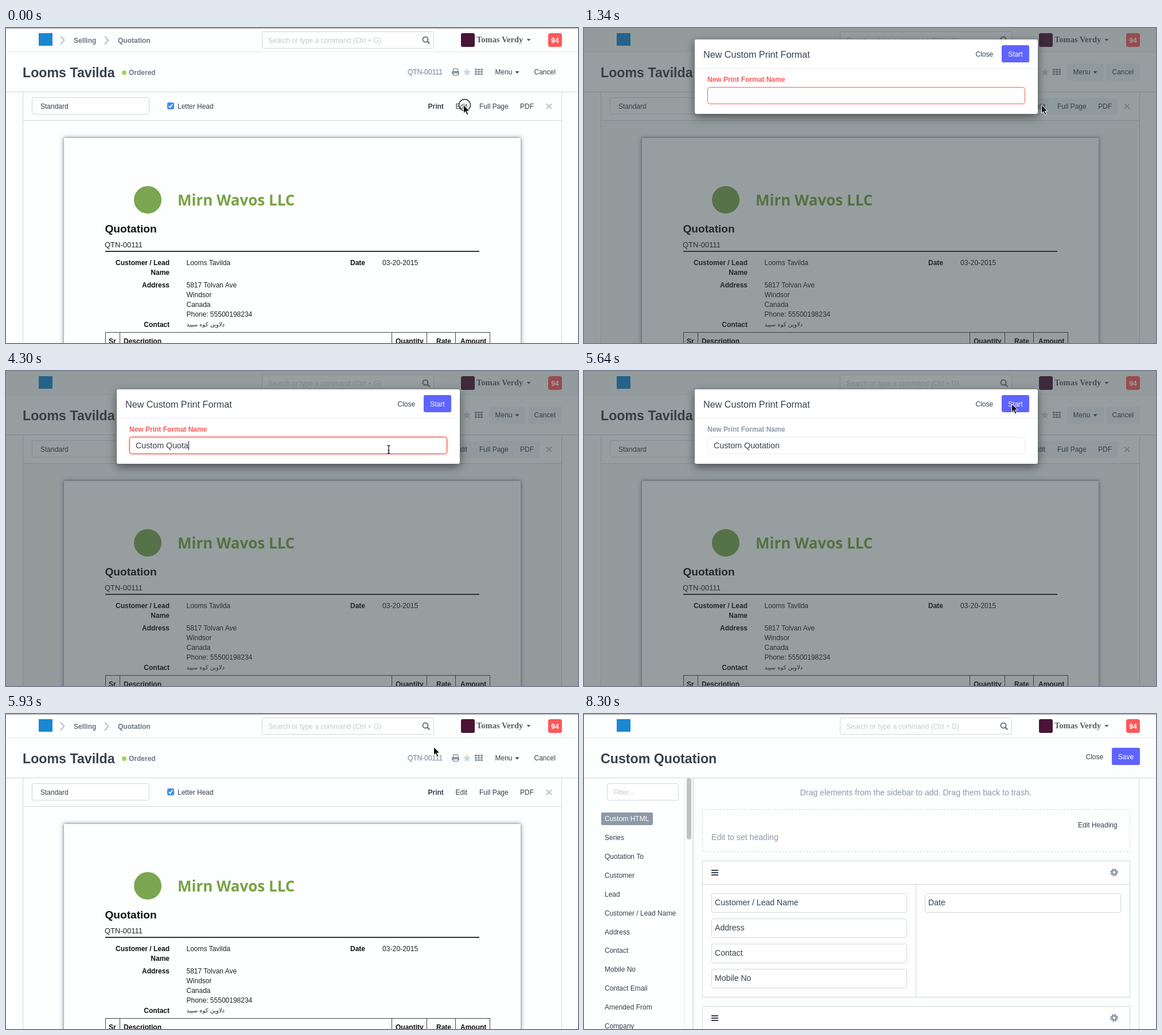
An HTML page for the animation above (8790 ms loop, 997 by 550 pixels).

```html
<!DOCTYPE html>
<html lang="en">
<head>
<meta charset="utf-8">
<title>Custom print format</title>
<style>
html, body { margin: 0; width: 100%; height: 100%; overflow: hidden; background: #fdfefe; }
svg { display: block; }
text { font-family: "Liberation Sans", Arial, sans-serif; white-space: pre; }
</style>
</head>
<body>
<svg id="stage" width="997" height="550" viewBox="0 0 997 550"></svg>
<script>
const INK = '#36414c', MUTED = '#8d99a6', LINE = '#d1d8dd', RED = '#ff5858', BLUE = '#5e64ff', PAGE = '#fdfefe';

// Drawing helpers returning SVG markup
const text = (x, y, str, { size = 12, fill = INK, bold = false, anchor = 'start', extra = '' } = {}) =>
  `<text x="${x}" y="${y}" font-size="${size}" fill="${fill}" text-anchor="${anchor}" ${bold ? 'font-weight="700"' : ''} ${extra}>${str}</text>`;
const rect = (x, y, w, h, fill, extra = '') =>
  `<rect x="${x}" y="${y}" width="${w}" height="${h}" fill="${fill}" ${extra}/>`;
const box = (x, y, w, h, stroke = LINE, rx = 3, extra = '') =>
  rect(x + .5, y + .5, w - 1, h - 1, '#fefefe', `stroke="${stroke}" rx="${rx}" ${extra}`);
const hLine = (x1, x2, y, color = LINE, h = 1) => rect(x1, y, x2 - x1, h, color);
const vLine = (x, y1, y2, color = LINE, w = 1) => rect(x, y1, w, y2 - y1, color);
const stroke = (d, color, width = 1) => `<path d="${d}" fill="none" stroke="${color}" stroke-width="${width}"/>`;
const caretDown = (x, y, fill = INK) => `<path d="M${x} ${y}h7l-3.5 4z" fill="${fill}"/>`;
const group = (id, content) => `<g id="${id}">${content}</g>`;

const navbar = () =>
  rect(57, 9, 24, 22, '#1a88d0') +
  box(446, 6, 300, 30) +
  text(457, 26, 'Search or type a command (Ctrl + G)', { fill: '#c3cad0' }) +
  `<circle cx="731" cy="20" r="4.5" fill="none" stroke="#6c757d" stroke-width="2"/>` +
  stroke('M734.5 23.5l4 4', '#6c757d', 2.4) +
  rect(793, 9, 24, 24, '#4a1338', 'rx="3"') +
  text(820, 25, 'Tomas Verdy', { size: 14.5, bold: true, fill: '#5a5f63', extra: `style="font-family:'Liberation Serif',Times,serif"` }) +
  caretDown(907.5, 19, '#5a5f63') +
  rect(945, 9, 24, 24, RED, 'rx="4"') +
  text(957, 26, '94', { bold: true, fill: '#fff', anchor: 'middle' }) +
  hLine(0, 997, 41, '#e3e7ea');

const breadcrumbs = () =>
  [95, 172].map(x => stroke(`M${x} 14.5l6.5 7-6.5 7`, '#b8c0c8', 2)).join('') +
  text(118, 26, 'Selling', { bold: true, fill: '#6c7680' }) +
  text(195, 26, 'Quotation', { bold: true, fill: '#6c7680' });

const toolIcons = () =>
  rect(777, 75, 13, 6, MUTED, 'rx="1.5"') +
  `<path d="M779.8 75v-4h7l1 1v3M779.8 78.5h8v4h-8z" fill="#fff" stroke="${MUTED}" stroke-width="1.4"/>` +
  `<path d="M803.5 70l2 4.4 4.8.6-3.5 3.3.9 4.8-4.2-2.4-4.2 2.4.9-4.8-3.5-3.3 4.8-.6z" fill="${LINE}"/>` +
  [0, 1, 2].flatMap(r => [0, 1, 2].map(c => rect(817 + c * 5, 71 + r * 4, 4, 3, MUTED))).join('');

const paper = () => {
  const strong = { bold: true, fill: '#111', anchor: 'end' };
  const plain = { fill: '#222' };
  const columns = [[179, 'Sr'], [205, 'Description'], [679, 'Quantity'], [750, 'Rate'], [792, 'Amount']];
  return rect(101, 192, 796, 400, PAGE, 'style="filter:drop-shadow(0 0 2px #75828c) drop-shadow(0 0 4px #b4bfc7)"') +
    `<circle cx="247" cy="300" r="24" fill="#7aa650"/>` +
    text(299, 310, 'Mirn Wavos LLC', { size: 26, bold: true, fill: '#76a343', extra: `style="font-family:'Open Sans','Noto Sans',sans-serif"` }) +
    text(172.5, 357, 'Quotation', { size: 19.1, bold: true, fill: '#111' }) +
    text(172, 383, 'QTN-00111', { size: 13, ...plain }) +
    hLine(173, 825, 389, '#333', 2) +
    text(285, 414, 'Customer / Lead', strong) + text(285, 431, 'Name', strong) +
    text(285, 453, 'Address', strong) + text(285, 522, 'Contact', strong) + text(626, 414, 'Date', strong) +
    text(314.5, 414, 'Looms Tavilda', plain) + text(656, 414, '03-20-2015', { size: 12.2, ...plain }) +
    ['5817 Tolvan Ave', 'Windsor', 'Canada', 'Phone: 55500198234'].map((s, i) => text(314.5, 453 + i * 17, s, plain)).join('') +
    text(314.5, 521, 'دلاوین کوه سپید', { size: 10, ...plain, extra: `style="font-family:'DejaVu Sans',sans-serif"` }) +
    hLine(173, 844, 531, '#444') +
    [173, 198, 672, 733, 783, 843].map(x => vLine(x, 531, 550, '#444')).join('') +
    columns.map(([x, s]) => text(x, 551, s, { bold: true, fill: '#111' })).join('');
};

const quotationPage = () =>
  breadcrumbs() +
  group('shades',
    rect(0, 1, 997, 40, '#f5f7fa') + rect(30, 162, 938, 388, '#f5f7fa') +
    [[842, 62, 64], [910, 62, 59], [814, 122, 72], [886, 122, 44], [773, 122, 41]].map(([x, y, w]) => rect(x, y, w, 30, '#f0f3f7', 'rx="3"')).join('')) +
  rect(773, 121, 42, 30, '#e8edf1', 'id="editPressed" rx="3"') +
  text(29, 86, 'Looms Tavilda', { size: 23.2, bold: true }) +
  `<circle cx="206" cy="78" r="4" fill="#98d85b"/>` +
  text(214, 82, 'Ordered', { bold: true, fill: '#6c7680' }) +
  text(700, 81, 'QTN-00111', { fill: MUTED, extra: `stroke="${MUTED}" stroke-width=".3"` }) +
  toolIcons() +
  text(852.5, 81, 'Menu') + caretDown(887.5, 75.5) + text(920.5, 81, 'Cancel') +
  vLine(29, 112, 550) + vLine(968, 112, 550) + hLine(30, 968, 161) +
  box(45, 121, 205, 30) + text(60, 141, 'Standard') +
  rect(281, 130, 12, 12, '#3b8df5', 'rx="2.5"') + stroke('M283.7 136l2.5 2.8 4.2-6', '#fff', 1.7) +
  text(299, 141, 'Letter Head') +
  text(735.5, 141, 'Print', { bold: true }) +
  [[783.5, 'Edit'], [825, 'Full Page'], [896, 'PDF']].map(([x, s]) => text(x, 141, s)).join('') +
  stroke('M942 132.5l9 8.5m0-8.5l-9 8.5', '#b9bfc4', 2) +
  paper();

const sectionIcons = y =>
  [-5, -1, 3].map(d => rect(222, y + d, 12, 2, INK)).join('') +
  `<g fill="none" stroke="${MUTED}"><circle cx="924" cy="${y - .5}" r="3.8" stroke-width="3"/>` +
  `<circle cx="924" cy="${y - .5}" r="5.9" stroke-width="2.4" stroke-dasharray="2.3 2.33"/></g>`;

const builderPage = () => {
  const fields = ['Series', 'Quotation To', 'Customer', 'Lead', 'Customer / Lead Name', 'Address', 'Contact',
    'Mobile No', 'Contact Email', 'Amended From', 'Company'];
  const field = (x, y, w, s) => box(x, y, w, 34) + text(x + 6, y + 21, s, { size: 14.1 });
  return text(29, 86, 'Custom Quotation', { size: 23.2, bold: true }) +
    text(874.5, 79, 'Close') +
    rect(920, 59, 49, 30, BLUE, 'rx="3"') + text(944.5, 79, 'Save', { fill: '#fff', anchor: 'middle' }) +
    box(40, 121, 125, 30) + text(51, 141, 'Filter...', { fill: '#c3cad0' }) +
    rect(30, 172, 90, 22, MUTED, 'rx="2"') + text(36, 187, 'Custom HTML', { fill: '#fff' }) +
    fields.map((s, i) => text(36, Math.round(220 + i * 32.9), s)).join('') +
    vLine(175, 112, 550, '#e4e8eb') + rect(179, 112, 8, 107, '#c1c1c1', 'rx="4"') +
    vLine(189.5, 112, 550, LINE, 1.5) + vLine(967, 112, 550) +
    text(376.5, 142, 'Drag elements from the sidebar to add. Drag them back to trash.', { size: 14.13, fill: MUTED }) +
    box(206, 166, 746, 75, LINE, 0, 'stroke-dasharray="3 3"') +
    text(861, 198, 'Edit Heading') + text(222, 220, 'Edit to set heading', { size: 14.1, fill: MUTED }) +
    box(206, 256, 746, 239, LINE, 0) + hLine(206, 952, 297) + vLine(578, 297, 495) + sectionIcons(277) +
    ['Customer / Lead Name', 'Address', 'Contact', 'Mobile No'].map((s, i) => field(222, 313 + i * 44, 341, s)).join('') +
    field(594, 313, 342, 'Date') +
    box(206, 510, 746, 60, LINE, 0) + sectionIcons(531);
};

const modal = () =>
  rect(193, 32, 598, 130, '#fff', 'rx="3" style="filter:drop-shadow(0 5px 8px rgba(0,0,0,.5))"') +
  text(208, 64, 'New Custom Print Format', { size: 16.15 }) +
  text(682.5, 62, 'Close') +
  rect(728, 42, 48, 30, BLUE, 'rx="3"') + text(752, 62, 'Start', { fill: '#fff', anchor: 'middle' }) +
  hLine(193, 791, 82, '#e8ebee') +
  text(215, 106, 'New Print Format Name', { bold: true, extra: 'id="label"' }) +
  box(215, 115, 554, 30, RED, 4, 'id="input"') +
  text(226, 135, '', { size: 14.25, extra: 'id="typed"' }) +
  rect(0, 122, 1, 16, '#222', 'id="caret"');

const pointers = () =>
  `<circle id="ring" cx="2.5" cy=".5" r="10" fill="none" stroke="#222" stroke-width="1.3"/>` +
  `<path id="arrow" d="M.5.5v14.5l3.4-3.2 2.6 6 2.5-1.1-2.6-5.7h4.7z" fill="#111" stroke="#fff"/>` +
  `<path id="beam" d="M-2.5-7q2.5 0 2.5 2V5q0 2-2.5 2M2.5-7q-2.5 0-2.5 2M0 5q0 2 2.5 2M-1.5 1.5h3" fill="none" stroke="#222" stroke-width="1.3"/>`;

document.getElementById('stage').innerHTML =
  rect(0, 0, 997, 550, PAGE) + group('quotation', quotationPage()) + group('builder', builderPage()) +
  group('nav', navbar()) + hLine(0, 997, 111) +
  rect(0, 1, 997, 549, '#334143', 'id="backdrop"') + group('modal', modal()) +
  hLine(0, 997, 0, '#999') + group('cursor', pointers());

const el = Object.fromEntries([...document.querySelectorAll('[id]')].map(e => [e.id, e]));
const show = (e, visible) => e.setAttribute('display', visible ? 'inline' : 'none');
const set = (e, attrs) => Object.entries(attrs).forEach(([k, v]) => e.setAttribute(k, v));

const LOOP = 8790, STEP = 148.2;

// Stepped tracks: each entry holds from its time until the next one
const cursorTrack = [
  [0, 797, 134], [1630, 768, 140], [1780, 716, 147], [1930, 680, 149], [2070, 669, 142], [2220, 667, 137],
  [5040, 684, 120], [5190, 716, 86], [5340, 741, 61], [5490, 745, 57],
  [6820, 738, 74], [6970, 718, 106], [7120, 708, 122], [7410, 711, 122], [7560, 714, 123], [8160, 739, 171]];
const typingTrack = [
  [0, 0], [2970, 1], [3120, 2], [3270, 4], [3410, 6], [3560, 7], [3710, 8], [3860, 10],
  [4150, 11], [4300, 12], [4450, 14], [4600, 16]];
const at = (track, t) => track.findLast(([start]) => start <= t).slice(1);
const within = (t, start, end) => t >= start && t < end;
const ramp = (t, start, duration) => Math.min(1, Math.max(0, (t - start) / duration));
const easeOut = p => 1 - (1 - p) ** 2;

// The dialog slides down while fading in, and back up while fading out
function dialogState(t) {
  const open = 1214, close = 5733, slide = 300, travel = 33;
  return {
    dim: .5 * (ramp(t, open - 200, 200) - ramp(t, close, 110)),
    opacity: ramp(t, open, 100) - ramp(t, close, 180),
    offset: -travel * (1 - easeOut(ramp(t, open, slide)) + easeOut(ramp(t, close, slide))),
  };
}

function render(t) {
  const held = Math.floor((t + 7) / STEP) * STEP;
  const { dim, opacity, offset } = dialogState(held);
  const [x, y] = at(cursorTrack, t);
  const [typedLength] = at(typingTrack, t);
  const beam = within(t, 2070, 5040);
  const focused = within(t, 2370, 5490);
  const accepted = t >= 5490;

  show(el.quotation, t < 6080);
  show(el.builder, t >= 6380);
  set(el.shades, { opacity: Math.min(1, dim * 2) });
  show(el.editPressed, within(t, 150, 290));

  set(el.backdrop, { opacity: dim });
  show(el.modal, opacity > 0);
  set(el.modal, { opacity, transform: `translate(0 ${Math.round(offset)})` });
  set(el.label, { fill: accepted ? MUTED : RED });
  set(el.input, { stroke: accepted ? '#e6eaed' : focused ? '#ff3a30' : RED });
  el.input.style.filter = focused ? 'drop-shadow(0 0 2px rgba(255,88,88,.6))' : '';
  el.typed.textContent = 'Custom Quotation'.slice(0, typedLength);
  show(el.caret, focused);
  if (focused) set(el.caret, { x: Math.round(226 + el.typed.getComputedTextLength()) });

  show(el.cursor, t < 8300);
  set(el.cursor, { transform: `translate(${x} ${y})` });
  show(el.arrow, !beam);
  show(el.beam, beam);
  show(el.ring, t < 150 || within(t, 2370, 2520) || within(t, 5490, 5640));
}

const startTime = performance.now();
function tick() {
  render((performance.now() - startTime) % LOOP);
  requestAnimationFrame(tick);
}
tick();
</script>
</body>
</html>
```
